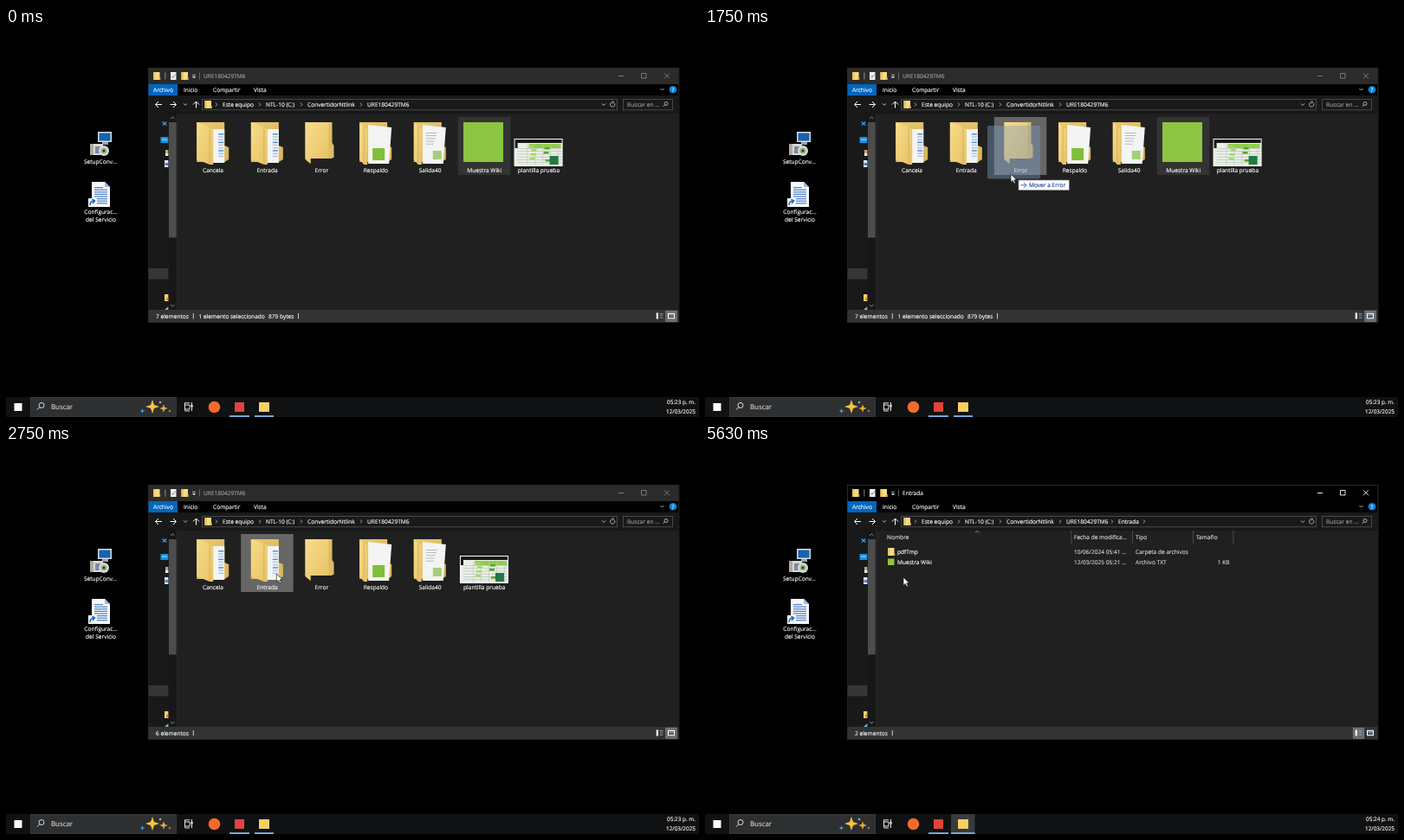
An HTML page for the animation above (8 s loop, 800 px wide and 450 px high).

```html
<!DOCTYPE html>
<html lang="es">
<head>
<meta charset="utf-8">
<title>Explorador de archivos</title>
<style>
  html, body { margin: 0; width: 100%; height: 100%; overflow: hidden; background: #000; }
  svg { display: block; width: 100vw; height: 100vh; }
  text { font-family: "Open Sans", "Noto Sans", sans-serif; text-rendering: geometricPrecision; white-space: pre; }
</style>
</head>
<body>
<svg viewBox="0 0 800 450">
  <defs>
    <linearGradient id="folder" x2="1" y2="1"><stop stop-color="#e9c86f"/><stop offset="1" stop-color="#d9b458"/></linearGradient>
    <linearGradient id="flap" x2="1" y2="1"><stop stop-color="#f8dc8a"/><stop offset="1" stop-color="#e6c266"/></linearGradient>
  </defs>
  <g id="scene"></g>
</svg>
<script>
const LOOP = 8000, STEP = 125, LAST_STEP = 34, CLOCK_TICK = 5630;
const DRAG_START = 11, DROP = 18, MOVED = 22, FOCUS = 24, OPEN = 28;
const FOLDERS = ['Cancela', 'Entrada', 'Error', 'Respaldo', 'Salida40'];
const CURSOR = [[1, 690, 440], [4, 600, 250], [7, 549, 157], [10, 546, 150], [11, 524, 154],
  [14, 353, 169], [17, 318, 153], [20, 313, 149], [26, 311, 149], [28, 300, 158],
  [31, 258, 186], [34, 229, 153]];

const rect = (x, y, w, h, fill, more = '') =>
  `<rect x="${x}" y="${y}" width="${w}" height="${h}" fill="${fill}" ${more}/>`;
const circle = (x, y, r, fill, more = '') => `<circle cx="${x}" cy="${y}" r="${r}" fill="${fill}" ${more}/>`;
const shape = (d, fill, more = '') => `<path d="${d}" fill="${fill}" ${more}/>`;
const line = (d, color = '#fff', width = 1) =>
  `<path d="${d}" fill="none" stroke="${color}" stroke-width="${width}"/>`;
const at = (x, y, body) => `<g transform="translate(${x} ${y})">${body}</g>`;
// y is the middle of the lowercase letters
const label = (x, y, str, { fill = '#fff', size = 6.6, anchor = 'start' } = {}) =>
  `<text x="${x}" y="${y + size * 0.35}" font-size="${size}" fill="${fill}" stroke="${fill}" stroke-width=".14" text-anchor="${anchor}">${str}</text>`;
const centered = (x, y, str) => label(x, y, str, { anchor: 'middle' });
const repeat = (count, draw) => Array.from({ length: count }, (_, i) => draw(i)).join('');
const chevron = (x, y, color = '#ccc') => line(`M${x - 2} ${y - 1}l2 2l2-2`, color, 0.9);
const crumbArrow = x => line(`M${x - 1} 86.5l1.8 2l-1.8 2`, '#ccc', 0.8);
const magnifier = (x, y, r, color) =>
  line(`M${x - r} ${y}a${r} ${r} 0 1 1 ${2 * r} 0a${r} ${r} 0 1 1 ${-2 * r} 0M${x - r * 0.7} ${y + r * 0.7}l${-r} ${r}`, color, 0.9);
const sparkle = (x, y, r, fill) => {
  const q = r * 0.25;
  return shape(`M${x} ${y - r}L${x + q} ${y - q}L${x + r} ${y}L${x + q} ${y + q}L${x} ${y + r}L${x - q} ${y + q}L${x - r} ${y}L${x - q} ${y - q}Z`, fill);
};
const smallFolder = (x, y) => rect(x, y, 7.5, 9, '#f9db82') + rect(x, y, 2.5, 9, '#ecc765') + rect(x + 6, y + 6, 2.2, 3, '#e5bd57');

const dataLines = repeat(9, i => rect(25, 13 + i * 3.2, 6, 1.5, i % 3 ? '#a9c8e8' : '#4f8fce'));
const sheets = {
  Cancela: dataLines,
  Entrada: dataLines,
  Respaldo: rect(15, 30, 14, 14, '#7fbf3a'),
  Salida40: repeat(5, i => rect(14, 12 + i * 3.2, 13 - i, 0.8, '#aaa')) + rect(22, 33, 10, 10, '#a3cf77')
};

function folder(name) {
  if (name === 'Error')
    return rect(0, 0, 31, 42, 'url(#folder)') + shape('M27 27l4-3l2 3v14h-6z', '#e0bc62')
      + shape('M0 0h27v42h-21v6l-6-5z', 'url(#flap)') + line('M6 42v6', '#cda951', 0.6);
  const wide = name === 'Respaldo' || name === 'Salida40';
  const flap = wide ? 9 : 19;
  return shape('M0 0h32v27l5 2v14l-5 3h-32z', 'url(#folder)')
    + shape(wide ? 'M10 3l27 3l-3 42h-24z' : 'M17 8h15v39h-15z', '#f4f4f4')
    + sheets[name]
    + shape(`M0 0l${flap - 4} 5l4 3v41h-4l${4 - flap}-6z`, 'url(#flap)')
    + line(`M${flap - 4} 5v43`, '#d0ac55', 0.8);
}

const spreadsheet = () =>
  rect(0, 0, 56, 32, '#fff') + rect(0.8, 0.8, 54.4, 30.4, '#e9efe6') + rect(1, 1, 54, 4, '#171717')
  + rect(1, 5, 3, 6, '#171717') + rect(17, 6, 37, 5, '#8fce45')
  + repeat(6, i => rect(4, 11 + i * 3.3, 51, 0.6, '#aebcaa'))
  + repeat(5, i => rect(15 + i * 9, 6, 0.6, 25, '#b8c5b1'))
  + repeat(7, i => rect(17 + (i * 17) % 33, 8 + (i * 7) % 19, 6, 2.5, i % 2 ? '#58a32e' : '#a6d86a'))
  + rect(41, 20, 10, 10, '#1f7a45');

const desktop = () =>
  rect(106, 120, 16, 12, '#d6dde2') + rect(107.5, 121.5, 13, 9, '#1763ad') + rect(111, 132, 7, 3, '#9aa5ac')
  + rect(97, 134, 15, 13, '#d9d8d2') + rect(97, 134, 4, 13, '#aaa9a2') + rect(103, 137, 6, 8, '#7a89a0')
  + circle(113, 142, 6, '#cfd9db') + circle(113, 142, 3.3, '#9db26a') + circle(113, 142, 1.5, '#333')
  + centered(109, 154.5, 'SetupConv...')
  + shape('M99 178h15l6 6v23h-21z', '#f6f9fd') + shape('M114 178v6h6z', '#9dbbe0')
  + repeat(8, i => rect(102, 184 + i * 2.6, i ? 15 : 10, 1.2, '#4f7fc0'))
  + rect(95, 197, 10, 10, '#f4f4f4') + line('M97 205q0-5 5-5M99.5 198l3 2l-2.5 3', '#1766c0', 1.5)
  + centered(109.5, 212.5, 'Configurac...') + centered(109.5, 221.5, 'del Servicio');

function taskbar(active, clock) {
  return rect(0, 427, 800, 23, '#101112')
    + rect(9.5, 434, 9, 9, '#fff')
    + rect(28.3, 427.3, 168, 22.7, '#2d2f31', 'stroke="#47494b" stroke-width=".6"')
    + magnifier(41, 436.5, 3, '#eee') + label(52, 438.5, 'Buscar', { size: 7.9, fill: '#d5d5d5' })
    + sparkle(169, 438, 8, '#f6c33c') + sparkle(182, 440, 4.8, '#f2a93b')
    + sparkle(157.5, 443, 3, '#43a5e8') + sparkle(189, 443, 2, '#d98d35') + sparkle(178, 433, 1.8, '#fff0b0')
    + line('M206.5 433.5v9M206.5 436h5.5v5h-5.5M206.5 433.8h5.5M206.5 443h5.5M214.5 433v10', '#e4e4e4', 1)
    + rect(213.3, 436, 2.4, 2.4, '#e4e4e4')
    + circle(240.5, 438.5, 6.8, '#f36b2c')
    + rect(264, 433, 11, 11, '#e0443a')
    + (active ? rect(284, 427, 27.5, 23, '#383a3c') : '')
    + rect(292, 433, 12, 11, '#f7d063')
    + rect(258, 448.2, 23, 1.8, '#76b9ed')
    + rect(active ? 284 : 287, 448.2, active ? 27.5 : 22, 1.8, '#76b9ed')
    + label(796, 433, clock, { size: 6.4, anchor: 'end' })
    + label(796, 443.3, '12/03/2025', { size: 6.4, anchor: 'end' });
}

function titleBar(active, title) {
  const ink = active ? '#fff' : '#848484';
  return rect(164.3, 46.3, 612.6, 294, '#000', 'stroke="#3c3c3c" stroke-width=".7"')
    + (active ? '' : rect(164.6, 46.6, 612, 18.4, '#2b2b2b'))
    + smallFolder(170, 51) + rect(183.5, 51.5, 0.8, 8, '#aaa')
    + rect(190, 51, 6.5, 9, '#f2f2f2') + line('M191.3 55.5l1.5 2l2.6-4', '#777', 0.9)
    + smallFolder(202.5, 51) + line('M215 54.3h4', '#ddd', 0.8) + shape('M214.8 56h4.4l-2.2 2.2z', '#ddd')
    + rect(223, 51.5, 0.8, 8, '#777')
    + label(228, 55.8, title, { fill: active ? '#fff' : '#a0a0a0' })
    + line('M707 55.5h6', ink, 0.9) + line('M733.5 52.5h5.5v5.5h-5.5z', ink, 0.9)
    + line('M760 52.3l6 6M766 52.3l-6 6', ink, 0.9)
    + rect(164.5, 65, 33.5, 13, '#0066bf') + label(170, 71.8, 'Archivo')
    + label(205, 71.8, 'Inicio') + label(239, 71.8, 'Compartir') + label(286, 71.8, 'Vista')
    + chevron(757.5, 71) + circle(770, 71.3, 4.3, '#0b84dc') + centered(770, 71.5, '?');
}

function addressBar(focused, open) {
  const crumbs = [[250, 'Este equipo'], [300, 'NTL-10 (C:)'], [348, 'ConvertidorNtlink'], [417, 'URE180429TM6']];
  if (open) crumbs.push([477, 'Entrada']);
  return rect(164.6, 78, 612, 20.5, '#191919')
    + line('M180 88.5h-7M176 85l-3.5 3.5l3.5 3.5', '#fff', 1) + line('M189.5 88.5h7M193 85l3.5 3.5l-3.5 3.5', '#fff', 1)
    + chevron(207, 88.3) + line('M219.5 92.5v-7M216 88.5l3.5-3.5l3.5 3.5', '#fff', 1)
    + rect(226.4, 82.4, 479, 12.4, '#191919', 'stroke="#535353" stroke-width=".8"')
    + smallFolder(229.5, 84)
    + crumbs.map(([x, name]) => crumbArrow(x - 7) + label(x, 88.8, name)).join('')
    + (open ? crumbArrow(507) : focused ? crumbArrow(470.5) : '')
    + chevron(690, 88.5) + line('M702.3 86.8a2.7 2.7 0 1 1-2.2-1M699.8 84.2l2 1.6l-2 1.4', '#ccc', 0.8)
    + rect(712.4, 82.4, 57, 12.4, '#191919', 'stroke="#535353" stroke-width=".8"')
    + label(717, 88.8, 'Buscar en ...', { fill: '#9b9b9b' }) + magnifier(762, 87.5, 2, '#bbb');
}

const navigationPane = () =>
  rect(164.6, 98.5, 33, 227.5, '#191919')
  + line('M180.5 108.5l5 4M185 108.5l-4 4', '#3c9be6', 1.4)
  + rect(178.5, 126, 9, 7, '#1592e6') + rect(180, 128.5, 6, 1.2, '#9ad4fa')
  + rect(184, 141, 3.5, 6, '#c9a27c') + rect(184, 145, 3.5, 3, '#e8e8e8')
  + rect(183, 153, 4.5, 8, '#e9eef5') + rect(183.5, 156, 4, 3, '#4a82c8')
  + rect(164.6, 278, 23, 12.5, '#363636')
  + rect(183, 308, 4.5, 8, '#f4d06a') + rect(185, 312, 2.5, 3, '#e67d48')
  + shape('M183 326l4.5-4v4z', '#6fb6e6')
  + rect(187.7, 98.5, 9.3, 227.5, '#171717') + rect(188, 109, 8.7, 133.5, '#4d4d4d')
  + line('M190 105l2.3-2.2l2.3 2.2', '#999', 0.9) + line('M190 320l2.3 2.2l2.3-2.2', '#999', 0.9)
  + rect(197.5, 98.5, 0.8, 227.5, '#303030');

const itemX = i => 239 + 62.65 * i;
const highlight = (i, fill) => rect(itemX(i) - 30.5, 103, 60.5, 67, fill);

function iconView(step, target) {
  const moved = step >= MOVED;
  let out = '';
  if (!moved) out += highlight(5, step >= 7 && step < DRAG_START ? '#747474' : '#333');
  if (target >= 0) out += highlight(target, step >= FOCUS ? '#777' : '#666');
  FOLDERS.forEach((name, i) => {
    out += at(itemX(i) - 18.8, 109, folder(name)) + centered(itemX(i), 164.6, name);
  });
  if (!moved) out += rect(528, 109, 46, 46, '#8cc541') + centered(itemX(5), 164.6, 'Muestra Wiki');
  const last = itemX(moved ? 5 : 6);
  return out + at(last - 28.3, 128, spreadsheet()) + centered(last, 164.6, 'plantilla prueba');
}

const listView = () =>
  [[210, 'Nombre'], [426, 'Fecha de modifica...'], [497, 'Tipo'], [567, 'Tamaño']]
    .map(([x, name]) => label(x, 106.5, name, { fill: '#dedede' })).join('')
  + [422.5, 493, 563, 609.5].map(x => rect(x, 99, 0.8, 15, '#555')).join('')
  + line('M312 101.5l2.2-2l2.2 2', '#aaa', 0.8)
  + smallFolder(211, 119) + rect(211, 131.5, 7.5, 7.5, '#8cc541')
  + label(222, 123.8, 'pdfTmp') + label(222, 135.8, 'Muestra Wiki')
  + [[426, 123.8, '10/06/2024 05:41 ...'], [426, 135.8, '12/03/2025 05:21 ...'],
     [497, 123.8, 'Carpeta de archivos'], [497, 135.8, 'Archivo TXT']]
    .map(([x, y, str]) => label(x, y, str, { fill: '#d5d5d5' })).join('')
  + label(605.5, 135.8, '1 KB', { fill: '#d5d5d5', anchor: 'end' });

function statusBar(step) {
  const open = step >= OPEN, count = open ? 2 : step >= MOVED ? 6 : 7;
  const divider = x => rect(x, 330, 0.9, 6.5, '#ddd');
  let out = rect(164.6, 326, 612, 14, '#333') + label(173, 333.3, count + ' elementos') + divider(215.8);
  if (count === 7) out += label(222.5, 333.3, '1 elemento seleccionado') + label(303, 333.3, '879 bytes') + divider(337);
  if (step >= FOCUS && !open) out += label(222.5, 333.3, '1 elemento seleccionado') + divider(305);
  out += rect(open ? 748.3 : 761.8, 327.3, 12.4, 12, '#686868', 'stroke="#8c8c8c" stroke-width=".7"');
  return out + rect(750.7, 329.5, 2.3, 7, '#fff') + repeat(3, i => rect(754.5, 330 + i * 2.4, 4, 0.8, '#aaa'))
    + rect(764, 329.8, 8, 6.5, '#fff') + rect(765, 330.8, 6, 3, '#5f87a8') + rect(765, 333.5, 6, 1.7, '#444');
}

function cursorAt(step) {
  const i = Math.max(1, CURSOR.findIndex(([s]) => s >= step));
  const [s0, x0, y0] = CURSOR[i - 1], [s1, x1, y1] = CURSOR[i];
  const k = (step - s0) / (s1 - s0);
  return [x0 + (x1 - x0) * k, y0 + (y1 - y0) * k];
}

function dragImage(x, y, target) {
  let out = rect(x - 27, y - 56, 61, 61.5, '#7f9dc2', 'opacity=".42" rx="2"');
  if (target >= 0) {
    const tip = 'Mover a ' + FOLDERS[target];
    out += at(x + 9, y + 7, rect(0, 0, 16 + 3.25 * tip.length, 11.5, '#fff', 'stroke="#8a8a8a" stroke-width=".6"')
      + line('M2.5 5.8h6.5M6 2.8l3 3l-3 3', '#2b6fd0', 1) + label(12, 6, tip, { fill: '#173f9b' }));
  }
  return out;
}

function scene(step, clock) {
  const active = step >= FOCUS, open = step >= OPEN, dragging = step >= DRAG_START && step < DROP;
  const [x, y] = cursorAt(step);
  const under = Math.round((x - itemX(0)) / 62.65);
  const target = step >= DRAG_START && under < FOLDERS.length ? under : -1;
  return desktop() + taskbar(active, clock)
    + titleBar(active, open ? 'Entrada' : 'URE180429TM6') + addressBar(active, open)
    + rect(164.6, 98.5, 612, 228, '#202020') + navigationPane()
    + (open ? listView() : iconView(step, target)) + statusBar(step)
    + (dragging ? dragImage(x, y, target) : '')
    + (step ? at(x, y, shape('M0 0v9.4l2.2-2l1.6 3.6l1.6-.7l-1.6-3.5h3z', '#fff', 'stroke="#000" stroke-width=".6"')) : '');
}

const sceneNode = document.getElementById('scene');
let shown = '';
function frame() {
  const t = performance.now() % LOOP;
  const step = Math.min(LAST_STEP, Math.floor(t / STEP));
  const clock = t < CLOCK_TICK ? '05:23 p. m.' : '05:24 p. m.';
  if (shown !== step + clock) {
    shown = step + clock;
    sceneNode.innerHTML = scene(step, clock);
  }
  requestAnimationFrame(frame);
}
frame();
</script>
</body>
</html>
```
